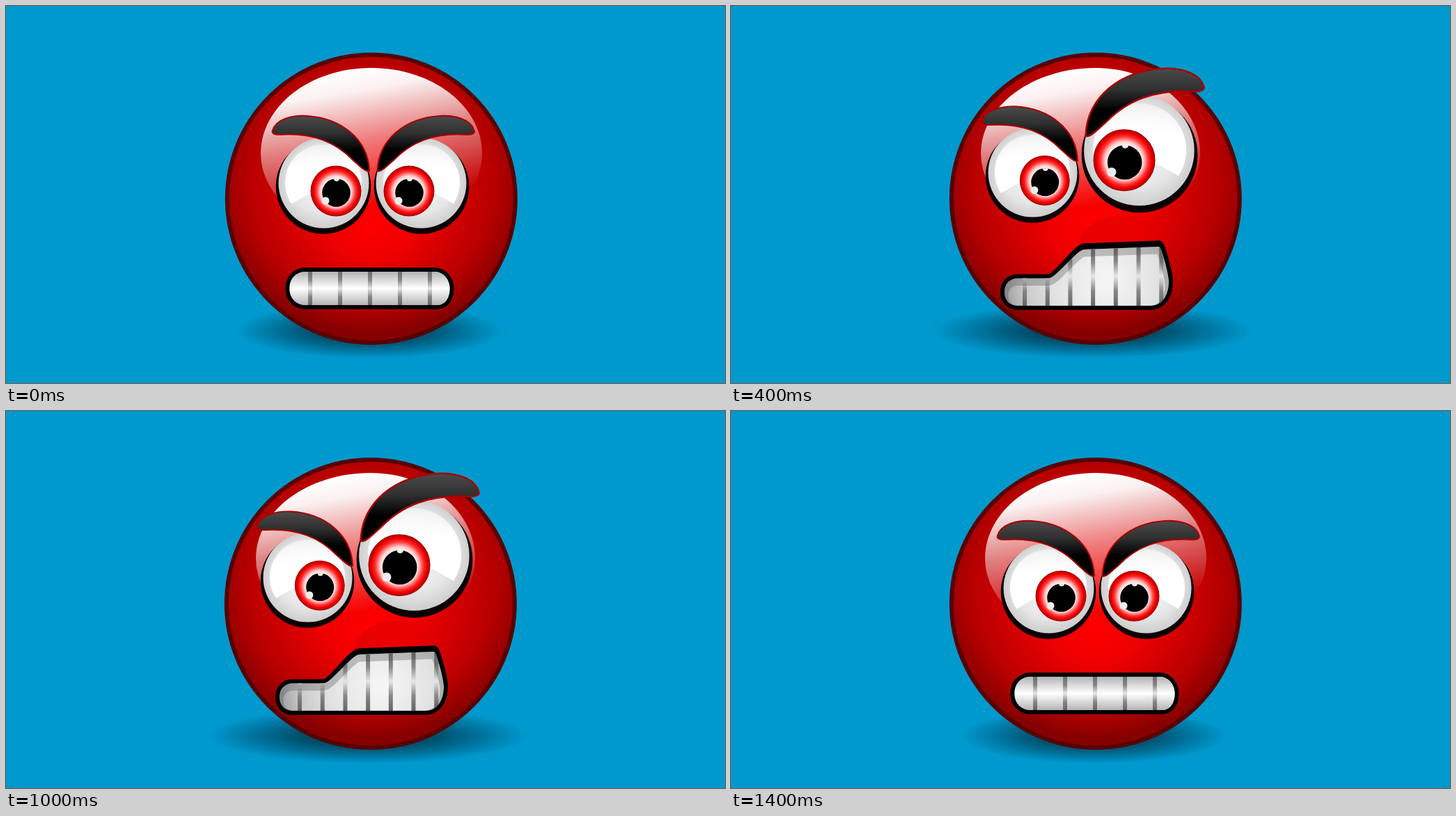
These frames come from a looping animation (1033x542 px, 1450 ms). An HTML page with a canvas:

```html
<!DOCTYPE html>
<html lang="en">
<head>
<meta charset="utf-8">
<title>Angry face</title>
<style>
html, body { margin: 0; width: 100%; height: 100%; overflow: hidden; background: #0099ce; }
canvas { display: block; width: 1033px; height: 542px; }
</style>
</head>
<body>
<canvas id="stage"></canvas>
<script>
const W = 1033, H = 542, STEP = 50, COUNT = 29, LAST = COUNT - 1, RAMP = 6, TAU = Math.PI * 2;
const canvas = document.getElementById('stage');
const ctx = canvas.getContext('2d');
const dpr = window.devicePixelRatio || 1;
canvas.width = Math.round(W * dpr);
canvas.height = Math.round(H * dpr);

// A mouth is a low left lobe, a ramp from x1 up to (x2, y2), a lip to (x3, y3) and a rounded right cheek.
const calm = { left: 407.5, lobe: 382, bottom: 430, x1: 470, x2: 570, y2: 382, x3: 616, y3: 382, right: 637.5, mid: 406, soft: 0.55, gap: 437, pitch: 43 };
const snarl = { ...calm, left: 402, lobe: 384, bottom: 418, x1: 468, x2: 574, y2: 351, x3: 580, y3: 351, right: 643, mid: 396, gap: 435, pitch: 44 };
const growl = { ...snarl, lobe: 399, bottom: 427, y2: 343, y3: 343, mid: 404, gap: 426, pitch: 35.4 };
const roar = { left: 393, lobe: 391.5, bottom: 431, x1: 456, x2: 508, y2: 350, x3: 615, y3: 346, right: 629, mid: 396, soft: 0.22, gap: 422, pitch: 32.7 };
const roarUp = { ...roar, x2: 519, y2: 338 };

const lerp = (a, b, t) => a + (b - a) * t;
const blend = (a, b, t) => Object.fromEntries(Object.keys(a).map(k => [k, lerp(a[k], b[k], t)]));

// Three steps to a half-way grimace, three more to the roar; the way back mirrors this.
function mouthAt(n) {
  const edge = Math.min(n, LAST - n) / RAMP;
  if (edge >= 1) return n % 2 ? roarUp : roar;
  const half = n < LAST / 2 ? snarl : growl;
  return edge < 0.5 ? blend(calm, half, edge * 2) : blend(half, roar, edge * 2 - 1);
}

function withStops(g, colors) {
  colors.forEach((c, i) => Array.isArray(c) ? g.addColorStop(...c) : g.addColorStop(i / (colors.length - 1), c));
  return g;
}
const linear = (x0, y0, x1, y1, ...colors) => withStops(ctx.createLinearGradient(x0, y0, x1, y1), colors);
const radial = (x0, y0, r0, x1, y1, r1, ...colors) => withStops(ctx.createRadialGradient(x0, y0, r0, x1, y1, r1), colors);

function disc(x, y, r, fill, stroke, width = 1) {
  ctx.beginPath();
  ctx.arc(x, y, r, 0, TAU);
  ctx.fillStyle = fill;
  ctx.fill();
  if (!stroke) return;
  ctx.strokeStyle = stroke;
  ctx.lineWidth = width;
  ctx.stroke();
}

function group(draw) {
  ctx.save();
  draw();
  ctx.restore();
}

function drawShadow(p) {
  group(() => {
    ctx.translate(lerp(522, 520, p), 467);
    ctx.scale(lerp(191, 230, p), 40);
    disc(0, 0, 1, radial(0, 0, 0, 0, 0, 1, 'rgba(0,18,28,.95)', 'rgba(0,18,28,0)'));
  });
}

function drawBody(p, dx) {
  const x = 524.8 + dx;
  disc(x, 277, 207, radial(x, 320, 0, x, 235, 235,
    '#ff0000', [0.3, '#ee0000'], [0.75, '#b80000'], [0.87, '#a00000'], [1, '#860000']), '#580000', 6);

  // The sides of the gloss slide left while its apex stays.
  const gx = lerp(525, 517.5, p) + dx, rx = lerp(159, 157.5, p), k = 0.448;
  const l = gx - rx, r = gx + rx, top = 89, wide = 212, rise = (wide - top) * k;
  ctx.beginPath();
  ctx.ellipse(gx, wide, rx, 119, 0, 0, Math.PI);
  ctx.bezierCurveTo(l, top + rise, lerp(l, x, k), top, x, top);
  ctx.bezierCurveTo(lerp(r, x, k), top, r, top + rise, r, wide);
  ctx.fillStyle = linear(gx - 17, 92, gx + 17, 285,
    '#fff', [0.15, 'rgba(255,255,255,.94)'], [0.5, 'rgba(255,255,255,.5)'], [1, 'rgba(255,255,255,0)']);
  ctx.fill();
}

const brow = new Path2D('M-73-79C-68-96-44-101-24-100C24-97 64-68 66-21C62-17 48-32 43-36C18-62-14-76-62-73C-70-73-75-75-73-79Z');

function drawIris(x, y) {
  disc(x, y, 36, radial(x, y + 1, 18, x, y, 36,
    '#fff4f4', [0.25, '#ffd0d0'], [0.58, '#ff3030'], [0.8, '#ec0000'], [1, '#b00000']), '#a00000');
  disc(x + 0.5, y + 2.5, 20.3, '#000');
  disc(x - 15, y + 14, 5.5, '#ececec');
  ctx.beginPath();
  ctx.arc(x + 1, y - 18, 4, 0, Math.PI);
  ctx.fillStyle = '#f4eaea';
  ctx.fill();
}

function drawEye(x, y, scale, side) {
  group(() => {
    ctx.translate(x, y);
    ctx.scale(scale, scale);
    group(() => {
      ctx.scale(side, 1);
      disc(0, 1.5, 68.3, '#0c0000');
      disc(0.5, -3.5, 65, radial(0, -14, 20, 0, -4, 66, '#f4f4f4', [0.6, '#e6e6e6'], [1, '#cdcdcd']));
      // Glossy upper wedge of the eyeball
      ctx.beginPath();
      ctx.arc(0, -4, 55, Math.PI * 0.813, Math.PI * 2.187);
      ctx.lineTo(0, 0);
      ctx.closePath();
      ctx.fillStyle = linear(0, -58, 0, 28, 'rgba(255,255,255,.45)', [0.4, '#fff'], [1, '#fff']);
      ctx.fill();
    });
    drawIris(side * 18, 8);
    group(() => {
      if (side < 0) ctx.translate(2.5, 0);
      ctx.scale(side, 1);
      ctx.fillStyle = linear(0, -101, 0, -50, '#4c4c4c', '#303030', '#000');
      ctx.fill(brow);
      ctx.strokeStyle = '#a80000';
      ctx.lineWidth = 2;
      ctx.stroke(brow);
    });
  });
}

function mouthPath(m, lift = 0) {
  const path = new Path2D();
  const y2 = m.y2 - lift, y3 = m.y3 - lift;
  const r = (m.bottom - m.lobe) * 0.46, s = m.soft;
  const ease = s * (m.x2 - m.x1), foot = m.right - 0.75 * (m.bottom - m.mid);
  path.moveTo(m.left + r, m.bottom);
  path.arcTo(m.left, m.bottom, m.left, m.lobe, r);
  path.arcTo(m.left, m.lobe, m.x1, m.lobe, r);
  path.lineTo(m.x1, m.lobe);
  path.bezierCurveTo(m.x1 + ease, m.lobe, m.x2 - ease, y2, m.x2, y2);
  path.lineTo(m.x3, y3);
  path.bezierCurveTo(lerp(m.x3, m.right, s), y3, m.right, lerp(m.mid, y3, s), m.right, m.mid);
  path.bezierCurveTo(m.right, lerp(m.mid, m.bottom, 0.6), lerp(foot, m.right, 0.6), m.bottom, foot, m.bottom);
  path.closePath();
  return path;
}

function drawMouth(m, p) {
  const path = mouthPath(m);
  const top = Math.min(m.y2, m.y3), bottom = m.bottom;
  const mood = Math.min(1, p * 2), wild = Math.max(0, p * 2 - 1);
  const flood = () => ctx.fillRect(380, top, 280, bottom - top);

  // Faint bulge of the lifted cheek
  ctx.beginPath();
  ctx.ellipse(562, 345, 62, 43, 0, 0, TAU);
  ctx.fillStyle = linear(530, 300, 600, 345, `rgba(110,0,0,${0.15 * wild})`, 'rgba(110,0,0,0)');
  ctx.fill();

  ctx.lineJoin = 'round';
  ctx.strokeStyle = '#000';
  ctx.lineWidth = 11.5;
  ctx.stroke(path);
  ctx.stroke(mouthPath(m, 3 * wild));

  group(() => {
    ctx.clip(path);
    ctx.fillStyle = radial(540, 395, 10, 535, 395, 140, '#f4f4f4', [0.5, '#e2e2e2'], [0.8, '#cacaca'], [1, '#a2a2a2']);
    flood();
    ctx.globalAlpha = 1 - mood;
    ctx.fillStyle = linear(0, top, 0, bottom, '#b2b2b2', '#dadada', '#fff', '#dadada', '#b4b4b4');
    flood();
    ctx.globalAlpha = 1;

    ctx.fillStyle = linear(0, top, 0, bottom, '#6c6c6c', '#868686', '#e6e6e6', '#868686', '#666');
    for (let x = m.gap; x < m.right; x += m.pitch) ctx.fillRect(x - 3, top, 6, bottom - top);

    ctx.translate(0, 5);
    ctx.strokeStyle = `rgba(70,70,70,${0.3 * mood})`;
    ctx.lineWidth = 11;
    ctx.stroke(path);
  });
}

function draw(n) {
  const p = Math.min(1, n / RAMP, (LAST - n) / RAMP);
  const shake = n && n % 2 === 0 ? -1 : 0;
  ctx.setTransform(dpr, 0, 0, dpr, 0, 0);
  ctx.fillStyle = '#0099ce';
  ctx.fillRect(0, 0, W, H);
  drawShadow(p);
  drawBody(p, shake);
  drawEye(lerp(456, 433, p), lerp(258, 243, p), lerp(1, 0.985, p), 1);
  drawEye(lerp(597, 587, p), lerp(258, 212, p), lerp(1, 1.22, p), -1);
  drawMouth(mouthAt(n), p);
}

const start = performance.now();
let shown = -1;
function tick(now) {
  const n = Math.floor(Math.max(0, now - start) / STEP) % COUNT;
  if (n !== shown) draw(shown = n);
  requestAnimationFrame(tick);
}
draw(shown = 0);
requestAnimationFrame(tick);
</script>
</body>
</html>
```
